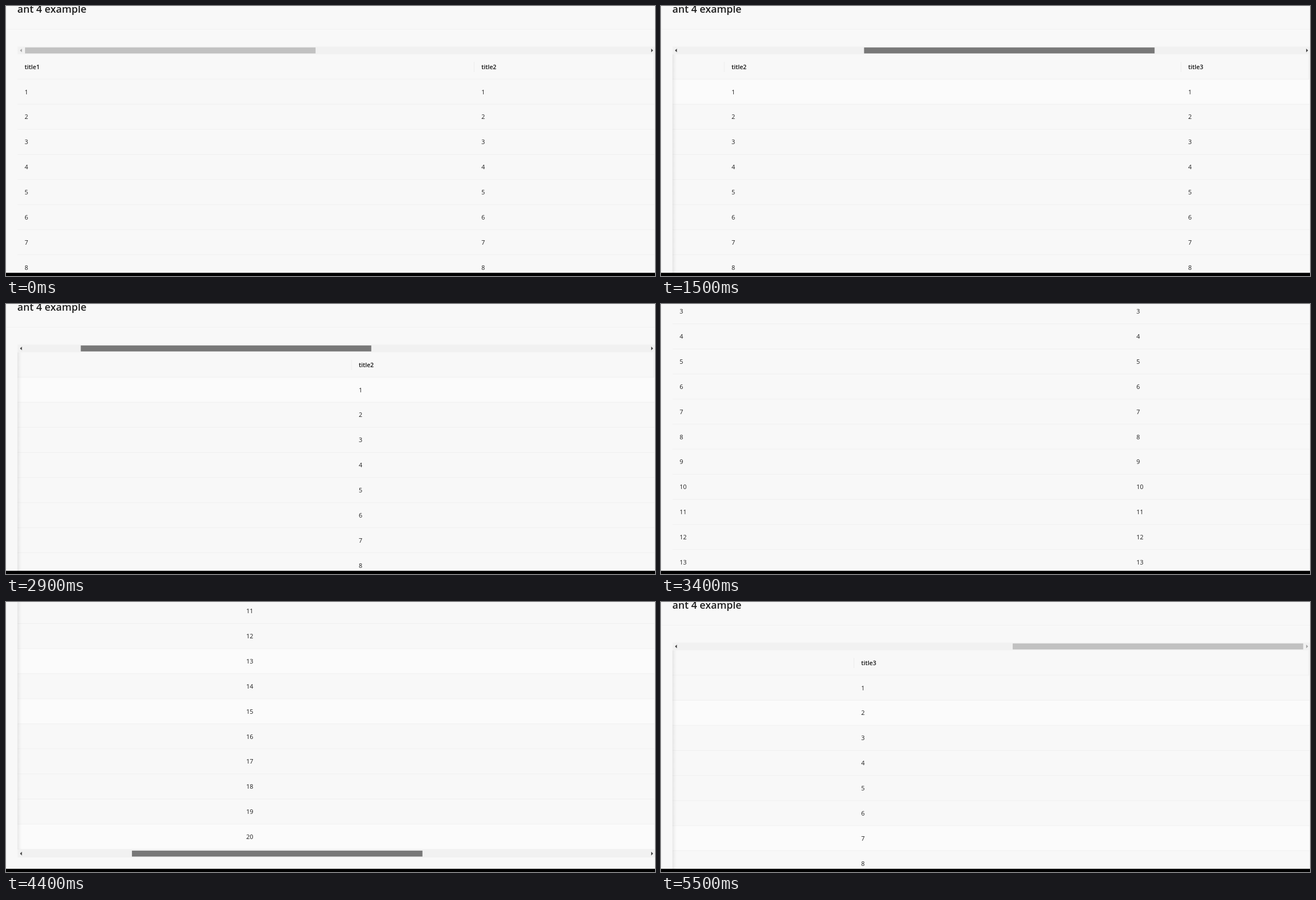
An HTML page that plays this animation: 1159 px wide and 483 px high, repeating every 6.7 s.

```html
<!DOCTYPE html>
<html lang="en">
<head>
<meta charset="utf-8">
<title>Table with two scrollbars</title>
<style>
html, body { margin: 0; width: 100%; height: 100%; overflow: hidden; background: #f8f8f8; }
svg { display: block; width: 1159px; height: 483px; }
text { font: 11px "Open Sans", "Noto Sans", sans-serif; fill: #1e1e1e; }
.head { font-size: 10.8px; font-weight: 600; fill: #141414; }
.title { font-size: 18.1px; font-weight: 600; fill: #1c1c1c; }
</style>
</head>
<body>
<svg id="stage" viewBox="0 0 1159 483">
  <defs>
    <clipPath id="clip"><rect x="20.5" y="-50" width="1139" height="1200"/></clipPath>
    <linearGradient id="fade">
      <stop offset="0" stop-color="#000" stop-opacity=".08"/>
      <stop offset=".45" stop-color="#000" stop-opacity=".03"/>
      <stop offset="1" stop-color="#000" stop-opacity="0"/>
    </linearGradient>
  </defs>
  <rect width="1159" height="483" fill="#f8f8f8"/>
  <g id="page"></g>
  <rect width="1" height="477" fill="#f1f1f1"/>
  <rect y="477.3" width="1159" height="6" fill="#000"/>
</svg>
<script>
const LOOP = 6700, ROW = 44.85, COL = 815.6, ROWS = 20;
const TOP = 86.4, BODY = 131.2, BAR_GAP = 956.4;
const IDLE = '#c1c1c1', HOVER = '#a8a8a8', DRAG = '#787878';

// time, horizontal scroll, vertical scroll, thumb colour, lit rows
const STATES = [
  [0, 0, 0, IDLE, []],
  [800, 0, 0, HOVER, []],
  ...run(1100, [40, 190, 410, 610, 723], 0, DRAG, [1]),
  ...run(1700, [750, 960, 1163], 0, DRAG, [1]),
  ...run(2100, [1190, 1204], 0, DRAG, [1]),
  ...run(2500, [1150, 980, 730, 460, 219, 60, 0], 0, DRAG, [1]),
  [3200, 0, 0, IDLE, []],
  [3400, 0, 230, IDLE, []],
  [3500, 0, 540, IDLE, []],
  [3700, 0, 585.8, IDLE, [13]],
  [4100, 0, 585.8, HOVER, [13]],
  ...run(4400, [420, 950, 1130, 1223, 1293, 1307], 585.8, DRAG, [13, 15, 20]),
  [5000, 1307, 585.8, IDLE, [13, 15, 20]],
  [5200, 1307, 410, IDLE, []],
  [5300, 1307, 120, IDLE, []],
  [5500, 1307, 0, IDLE, [2, 7]]
];

function run(start, list, v, color, lit) {
  return list.map((h, i) => [start + i * 100, h, v, color, lit]);
}

const page = document.getElementById('page');

function add(parent, name, attrs, label) {
  const el = document.createElementNS('http://www.w3.org/2000/svg', name);
  for (const key in attrs) el.setAttribute(key, attrs[key]);
  if (label !== undefined) el.textContent = label;
  parent.appendChild(el);
  return el;
}

function rect(parent, x, y, width, height, fill) {
  return add(parent, 'rect', { x, y, width, height, fill });
}

function makeBar(y) {
  const g = add(page, 'g', { transform: `translate(0 ${y})` });
  rect(g, 20.5, 72.6, 1138.5, 13.8, '#f1f1f1');
  return {
    thumb: rect(g, 34, 74.2, 518.8, 10.6, IDLE),
    left: add(g, 'path', { d: 'M25 79.5l3.4-3.3v6.6z' }),
    right: add(g, 'path', { d: 'M1155.6 79.5l-3.4-3.3v6.6z' })
  };
}

add(page, 'text', { x: 20.3, y: 11.6, class: 'title' }, 'ant 4 example');
rect(page, 0, 41, 1159, 1, '#f1f1f1');

const rows = [];
for (let i = 0; i < ROWS; i++) {
  const y = BODY + i * ROW;
  rows.push(rect(page, 20.5, y, 1138.5, ROW, '#fbfbfb'));
}
for (let i = 0; i <= ROWS; i++) rect(page, 20.5, BODY - 0.7 + i * ROW, 1138.5, 0.9, '#efefef');

const view = add(page, 'g', { 'clip-path': 'url(#clip)' });
const cells = add(view, 'g', {});
for (let c = 0; c < 3; c++) {
  const x = 33.3 + c * COL;
  add(cells, 'text', { x, y: 112.6, class: 'head' }, 'title' + (c + 1));
  if (c) rect(cells, x - 13.4, 100, 1, 18, '#ececec');
  for (let r = 0; r < ROWS; r++) {
    add(cells, 'text', { x, y: 157.6 + r * ROW }, r + 1);
  }
}
const shade = rect(page, 20.5, TOP, 8, BODY + ROWS * ROW - TOP, 'url(#fade)');
rect(page, 1156, TOP, 3, BODY - TOP, '#f2f2f2');
rect(page, 1158, BODY, 1, ROWS * ROW, '#f0f0f0');
const bars = [makeBar(0), makeBar(BAR_GAP)];

function draw(ms) {
  const t = ms % LOOP;
  const [, h, v, color, lit] = STATES.filter(s => s[0] <= t).pop();
  page.setAttribute('transform', `translate(0 ${-v})`);
  cells.setAttribute('transform', `translate(${-h} 0)`);
  shade.setAttribute('opacity', h > 0 ? 1 : 0);
  rows.forEach((row, i) => row.setAttribute('opacity', lit.includes(i + 1) ? 1 : 0));
  for (const bar of bars) {
    bar.thumb.setAttribute('x', 34 + h / 2.2);
    bar.thumb.setAttribute('fill', color);
    bar.left.setAttribute('fill', h > 0 ? '#404040' : '#a3a3a3');
    bar.right.setAttribute('fill', h < 1307 ? '#404040' : '#a3a3a3');
  }
}

const start = performance.now();
function tick() {
  draw(performance.now() - start);
  requestAnimationFrame(tick);
}
tick();
</script>
</body>
</html>
```
